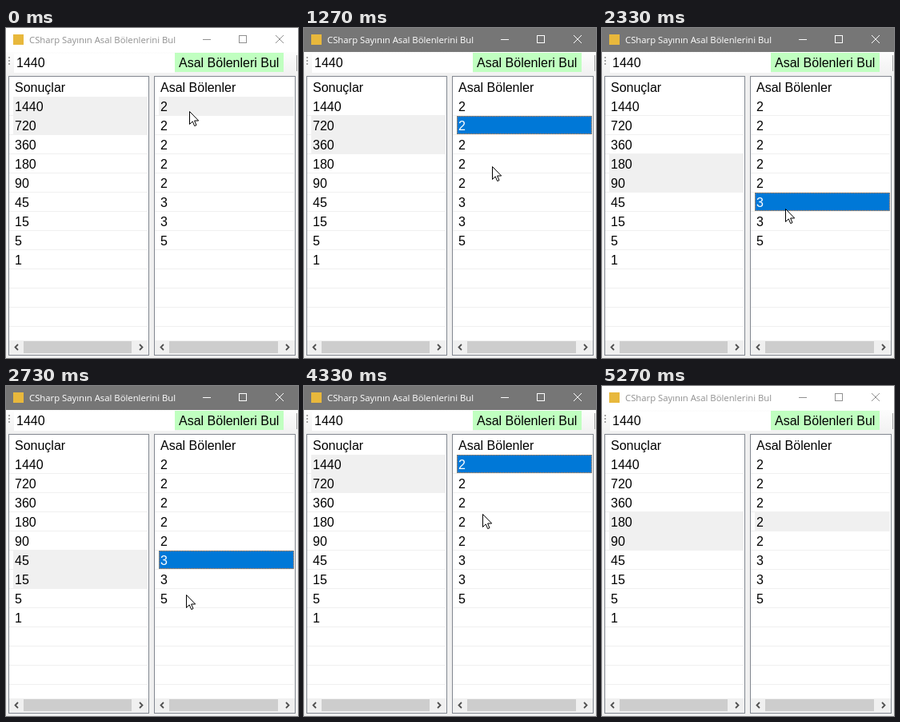
An HTML page for the animation above (5.39 s loop, 365 by 413 pixels).

```html
<!DOCTYPE html>
<html lang="tr">
<head>
<meta charset="utf-8">
<title>Asal Bölenler</title>
<style>
  html, body { margin: 0; width: 100%; height: 100%; overflow: hidden; background: #f0f0f0; }
  svg { display: block; width: 365px; height: 413px; font: 16px "Liberation Sans", Arial, sans-serif; }
  text { fill: #000; white-space: pre; }
  .title { font: 11.3px "Open Sans", "Noto Sans", sans-serif; }
  .crisp { shape-rendering: crispEdges; }
</style>
</head>
<body>
<svg id="stage" viewBox="0 0 365 413">
  <defs>
    <linearGradient id="bar" x2="0" y2="1">
      <stop stop-color="#fdfdfd"/><stop offset="1" stop-color="#f1f1f1"/>
    </linearGradient>
  </defs>
</svg>
<script>
const LOOP = 5390, TICK = 1000 / 15, ROW = 24, TOP = 86;
const NUMBER = 1440, LAG = 2, FOCUS = 7, BLUR = 79;

// Divide out the smallest prime until 1 is left
const results = [NUMBER], primes = [];
for (let n = NUMBER, p = 2; n > 1;) {
  if (n % p) { p++; continue; }
  primes.push(p);
  results.push(n /= p);
}

// Clicked rows: [tick, row]; the left list follows LAG ticks later
const clicks = [[-LAG, 0], [FOCUS, 1], [27, 3], [35, 5], [45, 7], [55, 0], [66, 3]];

// Pointer moves at even speed: [first tick, tick count, x, y]
const moves = [
  [0, 1, 229, 104], [1, 6, 232, 132], [17, 3, 235, 173], [30, 3, 229, 226],
  [39, 3, 225, 261], [48, 3, 243, 99], [62, 4, 223, 160], [68, 2, 211, 216], [70, 7, -9, 431]
];

const stage = document.getElementById("stage");

function add(tag, attrs) {
  const el = document.createElementNS("http://www.w3.org/2000/svg", tag);
  for (const k in attrs) el.setAttribute(k, attrs[k]);
  return stage.appendChild(el);
}
const rect = (x, y, width, height, fill, more) =>
  add("rect", { x, y, width, height, fill, class: "crisp", ...more });
const line = (d, stroke, more) => add("path", { d, stroke, fill: "none", ...more });
function label(x, y, str, more) {
  const el = add("text", { x, y, ...more });
  el.textContent = str;
  return el;
}

// Title bar
const titleBar = rect(0, 0, 365, 30, "#fff");
rect(9, 8, 13, 13, "#e8b83c");
const title = label(29, 18.5, "CSharp Sayının Asal Bölenlerini Bul", { class: "title" });
const buttons = [
  line("M246 14.5h10", "", { class: "crisp" }),
  line("M291.5 9.5h9v9h-9z", "", { class: "crisp" }),
  line("M337 9l10 10m0-10l-10 10", "")
];

// Toolbar
rect(0, 30, 365, 28, "url(#bar)");
for (let y = 36; y < 48; y += 4) rect(3, y, 2, 2, "#a6a6a6");
rect(10, 32, 201, 24, "#fff");
label(13, 49, NUMBER);
rect(211, 31, 136, 24, "#c0ffc0");
label(216, 49, "Asal Bölenleri Bul");
rect(363, 34, 1, 20, "#a0a0a0");

// A list frame with grid lines and scroll bar
function panel(x, width) {
  rect(x + 0.5, 60.5, width - 1, 349, "#fff", { stroke: "#828790" });
  for (let i = 1; i < 13; i++) rect(x + 1, TOP + i * ROW - 1, width - 3, 1, "#f0f0f0");
  rect(x + 1, 391, width - 2, 18, "#f0f0f0");
  rect(x + 19, 392, width - 41, 15, "#cdcdcd");
  const arrow = { "stroke-width": 1.8 };
  line(`M${x + 12} 396l-3.5 3.5 3.5 3.5`, "#505050", arrow);
  line(`M${x + width - 12} 396l3.5 3.5-3.5 3.5`, "#505050", arrow);
}
panel(3, 176);
panel(185, 177);

const pairBox = rect(9, 0, 168, 2 * ROW - 1, "#f0f0f0");
const primeBox = rect(191, 0, 169, ROW - 1, "#f0f0f0");
const focusBox = line("M191 .5h169M191 22.5h169M191.5 0v23M359.5 0v23", "#ff8728",
  { "stroke-dasharray": "1 1", class: "crisp" });

function column(x, head, items) {
  label(x, 80, head);
  return items.map((n, i) => label(x, TOP + 18 + i * ROW, n));
}
column(11, "Sonuçlar", results);
const primeLabels = column(193, "Asal Bölenler", primes);

const pointer = add("path", {
  d: "M.5 .5V16.5L4.2 12.9 6.7 18.6 9 17.6 6.6 12H11.7Z",
  fill: "#fff", stroke: "#000"
});

const rowAt = k => clicks.filter(c => c[0] <= k).pop()[1];

function pointerAt(k) {
  let x = 0, y = 0;
  for (const [first, count, tx, ty] of moves) {
    const p = Math.max(0, Math.min(1, (k - first + 1) / count));
    x += (tx - x) * p;
    y += (ty - y) * p;
  }
  return [Math.round(x), Math.round(y)];
}

function draw(k) {
  const active = k >= FOCUS && k < BLUR;
  const row = rowAt(k), y = TOP + row * ROW;
  const ink = active ? "#fff" : "#909090";

  titleBar.setAttribute("fill", active ? "#767676" : "#fff");
  title.style.fill = ink;
  buttons.forEach(b => b.setAttribute("stroke", ink));

  pairBox.setAttribute("y", TOP + rowAt(k - LAG) * ROW);
  primeBox.setAttribute("y", y);
  primeBox.setAttribute("fill", active ? "#0078d7" : "#f0f0f0");
  focusBox.setAttribute("transform", `translate(0 ${y})`);
  focusBox.setAttribute("visibility", active ? "visible" : "hidden");
  primeLabels.forEach((el, i) => { el.style.fill = active && i === row ? "#fff" : "#000"; });

  pointer.setAttribute("transform", `translate(${pointerAt(k)})`);
}

const start = performance.now();
function play() {
  const t = (performance.now() - start) % LOOP;
  draw(Math.floor((t + 4) / TICK));
  requestAnimationFrame(play);
}
play();
</script>
</body>
</html>
```
